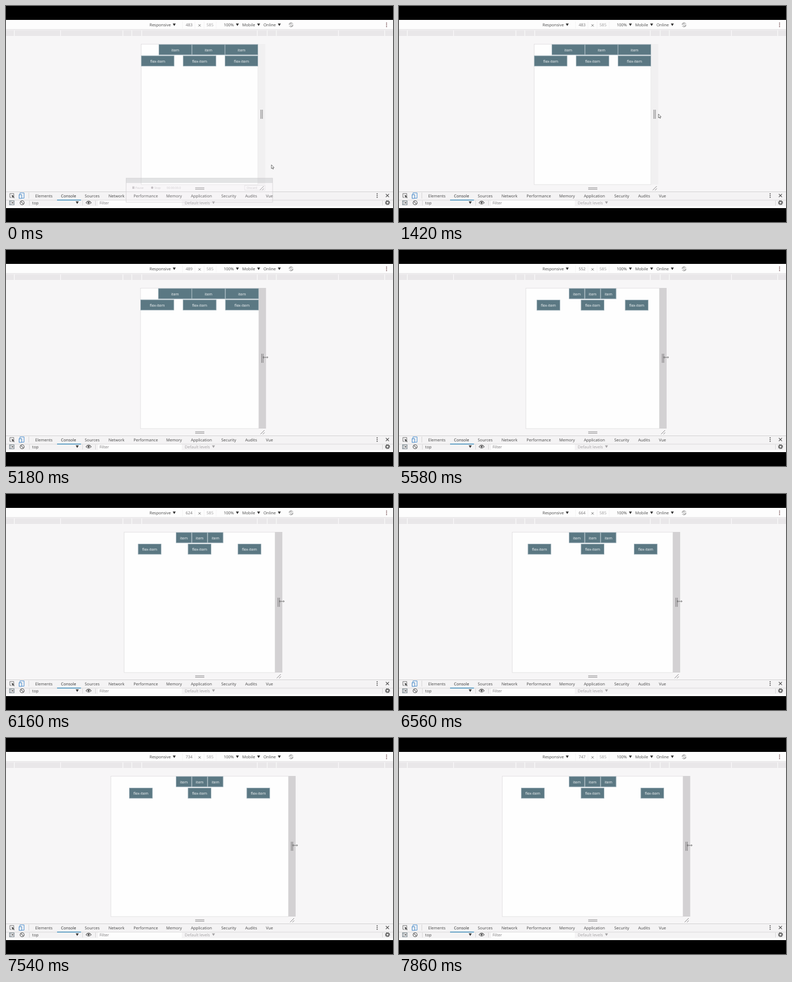
Animation of 720x404 px, one loop 8000 ms. Source, as an HTML page:

```html
<!DOCTYPE html>
<html lang="en">
<head>
<meta charset="utf-8">
<title>Responsive flex layout</title>
<style>
html, body { margin: 0; width: 100%; height: 100%; overflow: hidden; background: #000; }
svg { display: block; width: 100vw; height: 100vh; }
text { font: 7.5px "Open Sans", "Noto Sans", sans-serif; fill: #484848; text-rendering: geometricPrecision; white-space: pre; }
.tag { font-size: 6.85px; fill: #fff; text-anchor: middle; }
.ghost { font-size: 5.5px; fill: #cdc9cd; }
</style>
</head>
<body>
<svg id="stage" viewBox="0 0 720 404"></svg>
<script>
const LOOP = 8000, MID = 360.2, SCALE = 0.45, BREAK = 500;
const stage = document.getElementById('stage');

// Arrow positions: time, x, y
const pointer = [[0, 493.8, 297], [280, 499, 218], [700, 488, 207], [1100, 484.5, 204], [1420, 482.7, 202]];
// Viewport widths while dragging: time, width
const widths = [[0, 483], [5180, 489], [5340, 510], [5580, 552], [5740, 582], [6160, 624], [6320, 640],
  [6560, 664], [6720, 681], [6880, 696], [7120, 714], [7540, 734], [7860, 747]];

function add(tag, attrs, parent = stage) {
  const el = document.createElementNS('http://www.w3.org/2000/svg', tag);
  set(el, attrs);
  parent.appendChild(el);
  return el;
}
function set(el, attrs) {
  for (const k in attrs) el.setAttribute(k, attrs[k]);
}
const rect = (x, y, width, height, fill, parent, more) => add('rect', { x, y, width, height, fill, ...more }, parent);
const line = (d, stroke, parent, w = 1) => add('path', { d, stroke, fill: 'none', 'stroke-width': w }, parent);
const shape = (d, fill, parent) => add('path', { d, fill }, parent);
function text(x, y, str, attrs, parent) {
  const el = add('text', { x, y, ...attrs }, parent);
  el.textContent = str;
  return el;
}
const caret = (x, y, fill = '#333') => shape(`M${x - 2.8} ${y - 2.3}h5.6l-2.8 4.8z`, fill);
function dots(x, y, fill) {
  for (const dy of [-3.2, 0, 3.2]) add('circle', { cx: x, cy: y + dy, r: 1, fill });
}
const show = (el, on) => el.setAttribute('visibility', on ? 'visible' : 'hidden');
const at = (list, t) => list.filter(row => row[0] <= t).pop();

function drawToolbar() {
  rect(0, 26, 720, 352, '#f7f6f7');
  rect(0, 26, 720, 18, '#fdfdfd');
  rect(0, 43.5, 720, 1, '#dddcdd');
  rect(0, 45.5, 720, 10.5, '#e9e7e9');
  for (const x of [15.5, 101.5, 217.5, 234, 252.5, 467.5, 486, 503, 618.5, 704.5]) {
    rect(x - 0.6, 45.5, 1.2, 10.5, '#fbfafb');
  }
  text(267, 38, 'Responsive');
  caret(313, 35);
  line('M328.5 29V42M351.5 29V42M368.5 29V42M391 29V42', '#f0eef0', stage, 0.7);
  line('M358 34.2l4.2 4.2m0-4.2l-4.2 4.2', '#555', stage, 0.8);
  text(379.5, 38, '585', { 'text-anchor': 'middle', style: 'fill:#9d9b9d' });
  text(405, 38, '100%');
  caret(430.5, 35);
  text(439.5, 38, 'Mobile');
  caret(470, 35);
  text(479, 38, 'Online');
  caret(508.5, 35);
  add('circle', { cx: 530.3, cy: 35.2, r: 3.9, fill: 'none', stroke: '#777', 'stroke-width': 0.8, 'stroke-dasharray': '10 2.2' });
  line('M528 34l2-1.8 2.8 4.2-2 1.8z', '#777', stage, 0.7);
  dots(708, 35.2, '#7a5558');
}

function drawTabs() {
  rect(0, 347, 720, 31, '#f4f3f4');
  rect(0, 347, 720, 1, '#d2d1d2');
  rect(0, 362.6, 720, 0.9, '#d6d5d6');
  const tabs = { Elements: 54.3, Console: 102.3, Sources: 146.5, Network: 190.7, Performance: 237.2, Memory: 298,
    Application: 344, Security: 400.5, Audits: 445, Vue: 483.5 };
  for (const name in tabs) text(tabs[name], 357.5, name, name === 'Console' ? { style: 'fill:#2c2c2c' } : {});
  rect(95, 362.2, 44.5, 1.5, '#3f8fbe');

  line('M14.5 354V350.8H7.2V358H10', '#666', stage, 0.9);
  shape('M10.5 353.2l5.6 2.2-2.2 1 2 2.2-1 1-2.1-2.2-1 2z', '#555');
  line('M26 353V349.6H33.6V359.4H29.6', '#4a8fd0', stage, 1);
  rect(24.4, 353, 4.8, 6.8, '#f4f3f4', stage, { stroke: '#3d83c8', 'stroke-width': 1 });
  line('M42.5 349V360', '#cfcdcf', stage, 0.8);
  dots(690.5, 354.5, '#444');
  line('M706.7 351.6l5.8 5.8m0-5.8l-5.8 5.8', '#444', stage, 1.1);

  rect(6.5, 364.4, 8.6, 7.4, 'none', stage, { stroke: '#607078', 'stroke-width': 0.9 });
  line('M9 364.4V371.8', '#607078', stage, 0.9);
  shape('M13.4 365.8v4.4l-3-2.2z', '#555');
  add('circle', { cx: 30, cy: 368, r: 3.8, fill: 'none', stroke: '#555', 'stroke-width': 1.1 });
  line('M27.4 365.4l5.2 5.2', '#555', stage, 1.1);
  line('M43.5 364V373M142.5 364V373M166.5 364V373M700.5 364V373', '#d0ced0', stage, 0.8);
  text(48.8, 371, 'top');
  caret(132.5, 367.7);
  line('M148.8 368Q153.7 361.8 158.6 368Q153.7 373.6 148.8 368Z', '#555', stage, 1.1);
  add('circle', { cx: 153.7, cy: 367.8, r: 1.9, fill: '#555' });
  rect(171.5, 363.8, 155.5, 10.2, '#fdfdfd');
  text(174, 371, 'Filter', { style: 'fill:#7b797b' });
  text(332.5, 371, 'Default levels', { style: 'fill:#a5a3a5' });
  caret(386, 367.7, '#a5a3a5');
  add('circle', { cx: 709.8, cy: 367.8, r: 2.7, fill: 'none', stroke: '#555', 'stroke-width': 1.6 });
  add('circle', { cx: 709.8, cy: 367.8, r: 4.1, fill: 'none', stroke: '#555', 'stroke-width': 1.2, 'stroke-dasharray': '1.6 1.62' });
  rect(0, 374.3, 720, 3.7, '#fdfdfd');
  rect(0, 378, 720, 26, '#000');
}

function makeTag(label) {
  const g = add('g', {});
  const box = rect(0, 0, 10, 19.2, '#5b7883', g, { stroke: '#9cafb8', 'stroke-width': 0.9 });
  const caption = text(0, 12.7, label, { class: 'tag' }, g);
  return (x, y, width) => {
    set(g, { transform: `translate(${x} ${y})` });
    set(box, { width });
    set(caption, { x: width / 2 });
  };
}

drawToolbar();
const screen = rect(0, 71.3, 0, 262.7, '#fefefe', stage, { stroke: '#dddbdd', 'stroke-width': 0.8 });
const tags = [0, 1, 2].map(() => makeTag('item'));
const flexTags = [0, 1, 2].map(() => makeTag('flex-item'));
line('M352 340H369M352 342.8H369', '#858385', stage, 1);

const grip = add('g', {});
const strip = rect(0, 71, 13.3, 263, '', grip);
line('M5.2 194V211M7.9 194V211', '#858385', grip, 1.2);
line('M3 344.5l7.5-7.5M7.3 344.7l3.4-3.4', '#858385', grip, 1);
drawTabs();

const sizeText = text(340.7, 38, '', { 'text-anchor': 'middle', style: 'fill:#757375' });

// Recorder window that vanishes at the start
const ghost = add('g', {});
rect(223.5, 322, 272.5, 9, '#c9ccce', ghost, { opacity: 0.5 });
rect(223.5, 331, 272.5, 36, '#fbf9fa', ghost, { opacity: 0.15 });
rect(223.5, 322, 272.5, 45, 'none', ghost, { stroke: '#cbc8cb', 'stroke-width': 0.8, opacity: 0.8 });
rect(235, 337.5, 4, 4.5, '#cfcbcf', ghost);
text(240.5, 342, 'Pause', { class: 'ghost' }, ghost);
add('circle', { cx: 272, cy: 339.8, r: 2.2, fill: '#c4bfc4' }, ghost);
text(276, 342, 'Stop', { class: 'ghost' }, ghost);
text(299, 342, '00:00:00.0', { class: 'ghost' }, ghost);
rect(444, 335.5, 38, 9, 'none', ghost, { stroke: '#dddadd', 'stroke-width': 0.6 });
text(448, 342, 'Discard', { class: 'ghost' }, ghost);

const arrow = add('path', { d: 'M0 0V7.2L1.7 5.7 2.8 8.2 3.9 7.7 2.8 5.3H5Z', fill: '#fff', stroke: '#444', 'stroke-width': 0.75 });
const resizer = add('g', {});
line('M-4.3 0H4.3', '#555', resizer, 0.8);
line('M-3 -1.8L-4.7 0L-3 1.8M3 -1.8L4.7 0L3 1.8', '#555', resizer, 0.8);

function layout(w) {
  const W = w * SCALE, left = MID - W / 2, right = MID + W / 2, narrow = w <= BREAK;
  const size = 0.2805 * W;
  set(screen, { x: left, width: W });
  set(grip, { transform: `translate(${right + 0.2} 0)` });
  for (let i = 0; i < 3; i++) {
    if (narrow) {
      tags[i](right - 0.2815 * W - (2 - i) * 0.2833 * W, 72, size);
      flexTags[i](MID - size / 2 + (i - 1) * (W - size - 0.6) / 2, 93.1, size);
    } else {
      tags[i](316.6 + i * 29.4, 72, 28.5);
      flexTags[i](338.8 + (i - 1) * 0.1488 * w, 93.6, 42.7);
    }
  }
  sizeText.textContent = w;
  return right;
}

function draw(t) {
  const right = layout(at(widths, t)[1]);
  const [, x, y] = at(pointer, t);
  const resizing = t >= 2080;
  show(ghost, t < 280);
  set(strip, { fill: t < 2240 ? '#f1f0f1' : '#d3d1d3' });
  show(arrow, !resizing);
  show(resizer, resizing);
  set(arrow, { transform: `translate(${x} ${y})` });
  set(resizer, { transform: `translate(${right + (t < 5180 ? 10.2 : 12.4)} 200.8)` });
}

function tick() {
  draw(performance.now() % LOOP);
  requestAnimationFrame(tick);
}
tick();
</script>
</body>
</html>
```
